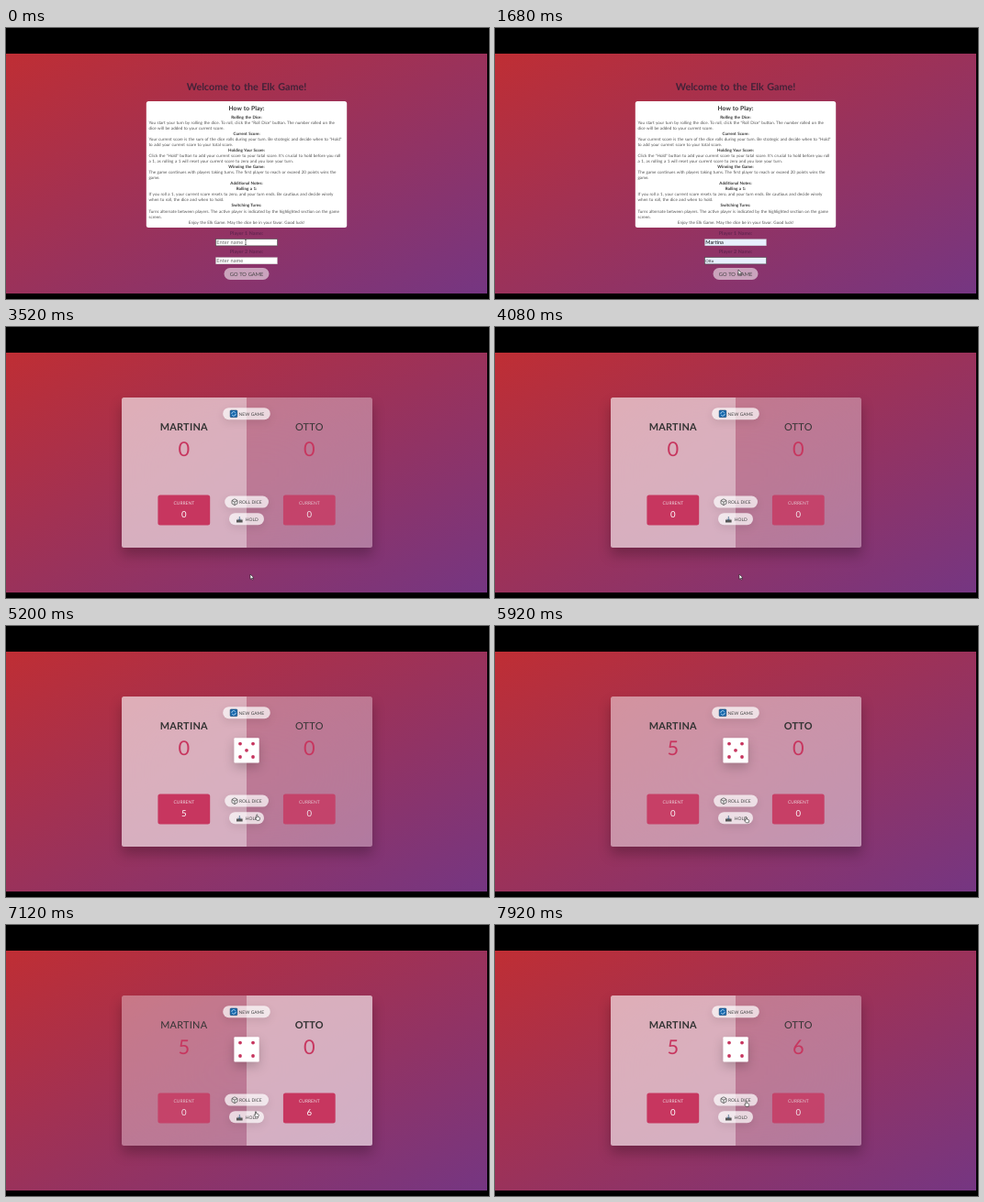
Write an HTML page that moves like this. It is 526 px wide and 296 px high and loops after 8 s.

```html
<!DOCTYPE html>
<html lang="en">
<head>
<meta charset="utf-8">
<style>
  html, body { margin: 0; width: 100%; height: 100%; overflow: hidden; background: #000; }
  #page { position: absolute; top: 28px; width: 524px; height: 262px;
    background: linear-gradient(to top left, #753682, #bf2e34); }
  #card { position: absolute; left: 125.5px; top: 77px; width: 273px; height: 164px;
    border-radius: 2.5px; overflow: hidden; background: rgba(255,255,255,.35);
    backdrop-filter: blur(55px); box-shadow: 0 8px 14px rgba(0,0,0,.25); }
  #card div { position: absolute; width: 50%; height: 100%; background: #fff; }
  #card div + div { left: 50%; }
  svg { position: absolute; left: 0; top: 0; }
  text { font-family: Lato, "Open Sans", sans-serif; fill: #333; text-rendering: geometricPrecision; word-spacing: .07em; }
  .mid { text-anchor: middle; }
  .b { font-weight: 700; }
  .body { fill: #505050; }
  .shadow { filter: drop-shadow(0 3px 4px rgba(0,0,0,.12)); }
</style>
</head>
<body>
<div id="page"></div>
<div id="card"><div></div><div></div></div>
<svg width="526" height="296" viewBox="0 0 526 296">
  <g id="intro"></g>
  <g id="game"></g>
  <g id="cursor" stroke-width=".6"></g>
</svg>
<script>
const LOOP = 8000, GAME_START = 3360;
const ROLLS = [[4700, 5], [6300, 2], [6720, 4]];
const HOLDS = [5680, 7190];
const NAMES = ['Martina', 'Otto'];
const CENTERS = [193.8, 330.3];
const $ = id => document.getElementById(id);

const text = (s, x, y, size, cls = '', attrs = '') =>
  `<text x="${x}" y="${y}" font-size="${size}" class="${cls}" ${attrs}>${s}</text>`;
const box = (x, y, w, h, r, attrs) =>
  `<rect x="${x}" y="${y}" width="${w}" height="${h}" rx="${r}" ${attrs}/>`;

// Lines starting with # are bold centred headings, with = plain centred.
const RULES = `#Rolling the Dice:
You start your turn by rolling the dice. To roll, click the "Roll Dice" button. The number rolled on the
dice will be added to your current score.
#Current Score:
Your current score is the sum of the dice rolls during your turn. Be strategic and decide when to "Hold"
to add your current score to your total score.
#Holding Your Score:
Click the "Hold" button to add your current score to your total score. It's crucial to hold before you roll
a 1, as rolling a 1 will reset your current score to zero and you lose your turn.
#Winning the Game:
The game continues with players taking turns. The first player to reach or exceed 20 points wins the
game.
#Additional Notes:
#Rolling a 1:
If you roll a 1, your current score resets to zero, and your turn ends. Be cautious and decide wisely
when to roll, the dice and when to hold.
#Switching Turns:
Turns alternate between players. The active player is indicated by the highlighted section on the game
screen.
=Enjoy the Elk Game. May the dice be in your favor. Good luck!`.split('\n');

const ruleLine = (s, i) => {
  const y = 99 + i * 6.03;
  if (s[0] === '#') return text(s.slice(1), 262, y, 4.5, 'mid b');
  if (s[0] === '=') return text(s.slice(1), 262, y, 4.55, 'mid body');
  return text(s, 155.5, y, 4.57, 'body');
};

const introStatic =
  text('Welcome to the Elk Game!', 262, 68.2, 10.8, 'mid b', 'style="fill:#432238"') +
  box(152.8, 80, 218.4, 138, 2.5, 'fill="#fff"') +
  text('How to Play:', 262, 89.6, 6.7, 'mid b') +
  RULES.map(ruleLine).join('') +
  [1, 2].map(n => text(`Player ${n} Name:`, 262, 206 + n * 20, 5.3, 'mid b', 'style="fill:#652551"')).join('');

// Each field shows a small preview of the suggestion before it is accepted.
const FIELDS = [{ y: 230.5, preview: 400, accept: 600 }, { y: 250.5, preview: 1300, accept: 1760 }];

function field(i, t) {
  const { y, preview, accept } = FIELDS[i];
  const filled = t >= preview, focused = i === (t < 960 ? 0 : 1);
  const border = focused ? 'stroke="#444" stroke-width=".6"' : 'stroke="#888" stroke-width=".25"';
  const label = t >= accept ? text(NAMES[i], 229.3, y + 5.7, 5.7, '', 'style="fill:#111"')
    : filled ? text(NAMES[i], 229.3, y + 5.4, 4.4)
    : text('Enter name', 229.3, y + 5.7, 5.7, '', 'style="fill:#666"');
  return box(228.4, y, 67.2, 7.4, 0, `fill="${filled ? '#e8f0fe' : '#fff'}" ${border}`) + label;
}

function drawIntro(t) {
  return introStatic + field(0, t) + field(1, t) +
    box(237.5, 262, 49, 13, 6.5, 'fill="#fff" fill-opacity=".55"') +
    text('GO TO GAME', 262, 270.5, 5.7, 'mid', 'style="fill:#444"');
}

const button = (x, y, w, label, labelX) =>
  box(x, y, w, 13, 6.5, 'fill="#fff" fill-opacity=".72" class="shadow"') +
  text(label, labelX, y + 8.4, 4.9, '', 'style="fill:#444"');

const buttons =
  button(236.2, 88.2, 51.6, 'NEW GAME', 253.6) +
  button(238.2, 184.6, 47.8, 'ROLL DICE', 254) +
  button(243, 203.2, 38, 'HOLD', 260.8) +
  box(244.2, 91, 7.6, 7.6, .8, 'fill="#1668ad" stroke="#123e68" stroke-width=".6"') +
  '<path d="M245.8 94.8a2.2 2.2 0 0 1 4-1.3M250.2 94.8a2.2 2.2 0 0 1-4 1.3" fill="none" stroke="#d8efff" stroke-width=".8"/>' +
  '<path d="M249 187.8l3 1.7v3.4l-3 1.7-3-1.7v-3.4zM246 189.5l3 1.7 3-1.7M249 191.2v3.4" fill="#eee" stroke="#444" stroke-width=".7"/>' +
  '<path d="M251 210.5h6.6v3h-6.6z" fill="#555"/><path d="M254.3 207v4M252.9 209.6l1.4 1.6 1.4-1.6" fill="none" stroke="#456b8c" stroke-width=".8"/>';

const PIPS = { 2: [[-1, -1], [1, 1]], 4: [[-1, -1], [1, -1], [-1, 1], [1, 1]] };
PIPS[5] = [...PIPS[4], [0, 0]];

const die = n => box(248.4, 122.2, 27.3, 27.3, 1, 'fill="#fff" style="filter:drop-shadow(0 5px 6px rgba(0,0,0,.2))"') +
  PIPS[n].map(([x, y]) => `<circle cx="${262 + x * 7}" cy="${135.8 + y * 7.2}" r="1.9" fill="#c7365f"/>`).join('');

const clamp = x => Math.max(0, Math.min(1, x));
const smooth = p => p * p * (3 - 2 * p);
const cssEase = p => smooth(1 - (1 - p) ** 1.8);

function gameState(t) {
  const scores = [0, 0], current = [0, 0];
  let active = 0, face = 0, holds = 0;
  const events = [...ROLLS, ...HOLDS.map(h => [h])].sort((a, b) => a[0] - b[0]);
  for (const [at, roll] of events) {
    if (at > t) break;
    if (roll) {
      face = roll;
      current[active] += roll;
    } else {
      scores[active] += current[active];
      current[active] = 0;
      active = 1 - active;
      holds++;
    }
  }
  const shift = holds ? cssEase(clamp((t - HOLDS[holds - 1]) / 750)) : 1;
  const glow = [0, 1].map(i => i === active ? shift : 1 - shift);
  return { scores, current, face, glow };
}

function drawGame({ scores, current, face, glow }) {
  const player = (x, i) =>
    text(NAMES[i].toUpperCase(), x, 112.8, 10.9, glow[i] > .45 ? 'mid b' : 'mid', 'letter-spacing=".27"') +
    text(scores[i], x, 141.4, 21.8, 'mid', 'style="fill:#c7365f"') +
    `<g opacity="${.8 + .2 * glow[i]}">` +
    box(x - 28.4, 183.5, 56.8, 33, 2.5, 'fill="#c7365f"') +
    text('CURRENT', x, 193.9, 4.9, 'mid', 'style="fill:#ecd6dd"') +
    text(current[i], x, 208, 9.6, 'mid', 'style="fill:#fff"') + '</g>';
  return CENTERS.map(player).join('') + buttons + (face ? die(face) : '');
}

// Pointer stops: time, x, y
const STOPS = [[0, 261, 234], [200, 261, 234], [400, 265, 245], [640, 265, 245], [860, 266, 254],
  [1040, 266, 254], [1300, 265, 264], [2400, 265, 264], [2700, 267, 271], [3280, 267, 271],
  [3400, 266, 270], [4120, 266, 270], [4260, 272, 192], [4900, 272, 192], [5300, 273, 208.5],
  [5940, 273, 208.5], [6200, 272, 191], [6900, 272, 191], [7120, 271.5, 203.5], [7190, 272, 207],
  [7400, 272, 207], [7700, 273, 192], [LOOP, 273, 192]];

const SHAPES = {
  arrow: '<path d="M0 0v5.4l1.3-1.1 .9 1.9 .9-.4-.9-1.8h1.7z" fill="#fff" stroke="#222"/>',
  hand: '<path d="M0 .3q.7-.6 1.1 .2v2l2.1 .6q.7 .3.5 1.2l-.6 2H.4l-1.8-2.3q.3-.9 1.4 0z" fill="#fff" stroke="#222"/>',
  beam: '<path d="M-1-2.6h2M0-2.6v5.2M-1 2.6h2" fill="none" stroke="#333"/>',
};

function drawCursor(t) {
  const i = STOPS.findIndex(s => s[0] > t);
  const [t0, x0, y0] = STOPS[i - 1], [t1, x1, y1] = STOPS[i];
  const p = smooth((t - t0) / (t1 - t0));
  const x = x0 + (x1 - x0) * p, y = y0 + (y1 - y0) * p;
  const within = spans => spans.some(([a, b]) => y >= a && y <= b);
  const kind = t < GAME_START
    ? within([[230, 238], [250, 258]]) ? 'beam' : y > 266 ? 'hand' : 'arrow'
    : within([[184, 198], [203, 216]]) ? 'hand' : 'arrow';
  return `<g transform="translate(${x} ${y})">${SHAPES[kind]}</g>`;
}

let shown = '';
function render(now) {
  const t = now % LOOP, playing = t >= GAME_START;
  const state = playing && gameState(t);
  const html = playing ? drawGame(state) : drawIntro(t);
  if (html !== shown) {
    $('intro').innerHTML = playing ? '' : html;
    $('game').innerHTML = playing ? html : '';
    shown = html;
  }
  $('card').style.display = playing ? 'block' : 'none';
  if (playing) [...$('card').children].forEach((half, i) => half.style.opacity = .4 * state.glow[i]);
  $('cursor').innerHTML = drawCursor(t);
}

const start = performance.now();
function tick() {
  render(performance.now() - start);
  requestAnimationFrame(tick);
}
tick();
</script>
</body>
</html>
```
